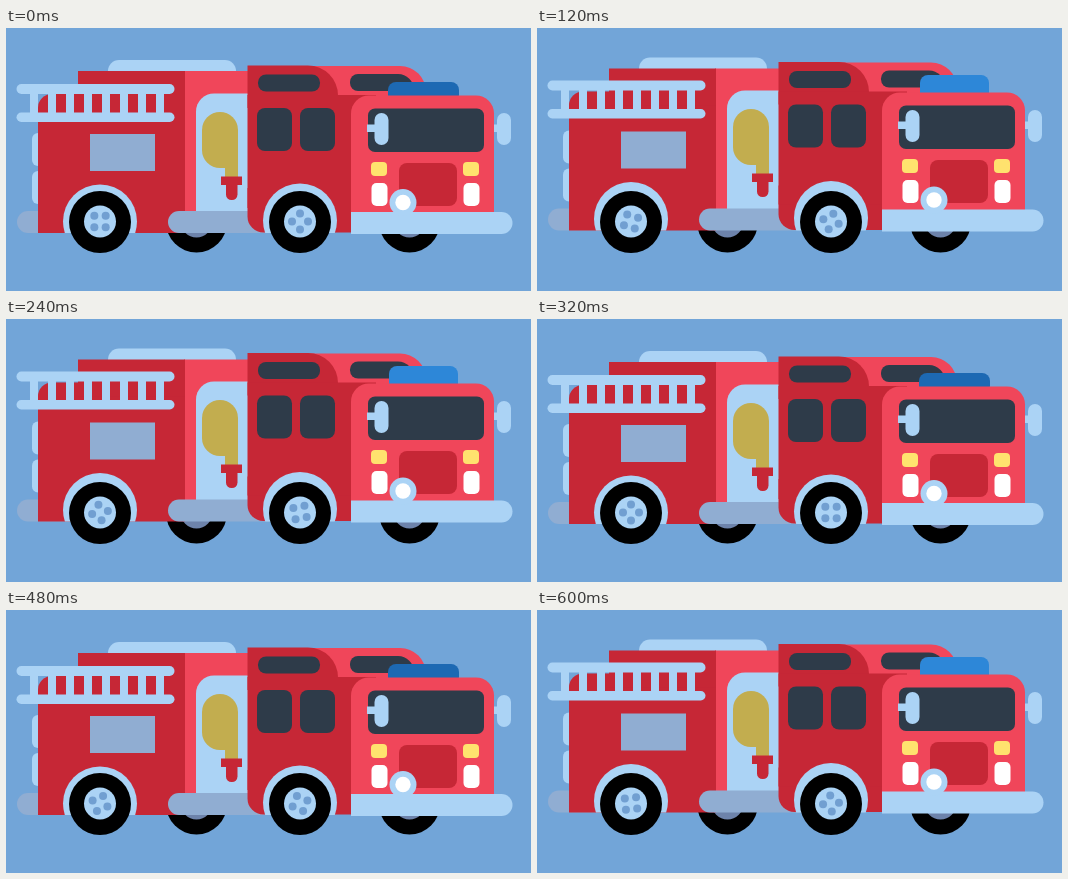
These frames come from a looping animation (525x263 px, 640 ms). An HTML page with a canvas:

```html
<!DOCTYPE html>
<html lang="en">
<head>
<meta charset="utf-8">
<title>Fire engine</title>
<style>
html, body { margin: 0; width: 100%; height: 100%; overflow: hidden; background: #72a5d8; }
canvas { display: block; }
</style>
</head>
<body>
<canvas id="stage" width="525" height="263"></canvas>
<script>
const ctx = document.getElementById("stage").getContext("2d");
const LOOP = 640, STEP = 40;
const SKY = "#72a5d8", PALE = "#abd3f5", STEEL = "#90add2", RED = "#c62736",
  BRIGHT = "#f0465a", GLASS = "#2e3b49", GOLD = "#c2ad4f", YELLOW = "#ffe26e";

// Filled box given by its edges; r is one radius or [tl, tr, br, bl]
function box(x1, y1, x2, y2, color, r = 0) {
  ctx.fillStyle = color;
  ctx.beginPath();
  ctx.roundRect(x1, y1, x2 - x1, y2 - y1, r);
  ctx.fill();
}

function disc(x, y, r, color) {
  ctx.fillStyle = color;
  ctx.beginPath();
  ctx.arc(x, y, r, 0, Math.PI * 2);
  ctx.fill();
}

function shifted(dy, draw) {
  ctx.save();
  ctx.translate(0, dy);
  draw();
  ctx.restore();
}

function arch(x, y) {
  ctx.save();
  ctx.beginPath();
  ctx.rect(x - 40, y - 40, 80, 205 - y + 40);
  ctx.clip();
  disc(x, y, 37, PALE);
  ctx.restore();
}

function wheel(x, angle) {
  disc(x, 194, 31, "#000");
  disc(x, 193.5, 16, PALE);
  for (let i = 0; i < 4; i++) {
    const a = angle + i * Math.PI / 2;
    disc(x + 8 * Math.cos(a), 193.5 + 8 * Math.sin(a), 4, "#719fd1");
  }
}

function farWheel(x) {
  disc(x, 194, 30.5, "#000");
  disc(x, 193.5, 16, "#6d83ab");
}

function rear() {
  box(26, 105, 40, 138, PALE, 6);
  box(26, 143, 40, 176, PALE, 6);
  box(102, 32, 230, 50, PALE, [11, 11, 0, 0]);
  box(11, 183, 70, 205, STEEL, [11, 0, 0, 11]);
  box(178, 43, 250, 190, BRIGHT);
  box(32, 66, 179, 205, RED, [14, 0, 0, 0]);
  box(72, 43, 179, 80, RED);
  box(84, 106, 149, 143, STEEL);
}

function hose() {
  box(190, 65.5, 250, 190, PALE, [18, 0, 0, 0]);
  box(196, 84, 232, 140, GOLD, [18, 18, 0, 18]);
  box(219, 125, 232, 150, GOLD);
  box(215, 148.5, 236, 157, RED);
  box(220, 156, 231.5, 172, RED, [0, 0, 5.5, 5.5]);
}

function ladder() {
  for (let i = 0; i < 8; i++) box(24 + 18 * i, 60, 32 + 18 * i, 90, PALE);
  box(10.5, 56, 168.5, 66, PALE, 5);
  box(10.5, 84.5, 168.5, 94, PALE, 5);
}

function cab() {
  box(290, 38, 420, 80, BRIGHT, [0, 26, 0, 0]);
  box(344, 46, 408, 63, GLASS, [8, 16, 0, 8]);
  box(241.5, 37.5, 332, 80, RED, [0, 30, 0, 0]);
  box(241.5, 67, 370, 180, RED);
  box(252, 46.5, 314, 63.5, GLASS, 8);
  box(251, 80, 286, 123, GLASS, 8);
  box(294, 80, 329, 123, GLASS, 8);
}

function face() {
  box(345, 67.5, 488, 190, BRIGHT, [18, 18, 0, 0]);
  box(362, 80.5, 478, 124, GLASS, 7);
  box(361, 96.5, 371, 104, PALE);
  box(368.5, 85, 382.5, 117, PALE, 7);
  box(488, 96.5, 493, 104, PALE);
  box(491, 85, 505, 117, PALE, 7);
  box(393, 135, 451, 178, RED, 8);
  for (const x of [365, 457]) {
    box(x, 134, x + 16, 148, YELLOW, 4);
    box(x + 0.5, 155, x + 16.5, 178, "#fff", 5);
  }
}

function render(time) {
  const step = Math.floor((time % LOOP) / STEP);
  const up = step % 4 > 1;
  const low = up ? -2.5 : 0, mid = up ? -3 : 0, high = up ? -3.5 : 0;
  const turn = step * STEP / LOOP * Math.PI / 2;

  box(0, 0, 525, 263, SKY);
  farWheel(190.5);
  farWheel(403.5);
  shifted(low, rear);
  shifted(mid, hose);
  shifted(high, ladder);
  shifted(low, () => {
    box(162, 183, 265, 205, STEEL, [11, 0, 0, 11]);
    box(241.5, 160, 346, 204.5, RED, [0, 0, 0, 16]);
  });
  shifted(high, cab);
  if (up) box(383, 47, 452, 75, "#2d87d8", 8);
  else box(382, 54, 453, 75, "#1d69b3", 8);
  shifted(mid, face);
  shifted(low, () => {
    box(345, 184, 506.5, 206, PALE, [0, 11, 11, 0]);
    disc(397, 174.5, 13.5, PALE);
    disc(397, 174.5, 7.7, "#fff");
    arch(94, 193.5);
    arch(294, 192.5);
  });
  wheel(94, Math.PI / 4 + turn);
  wheel(294, turn);
}

function tick() {
  render(performance.now() - start);
  requestAnimationFrame(tick);
}

const start = performance.now();
tick();
</script>
</body>
</html>
```
